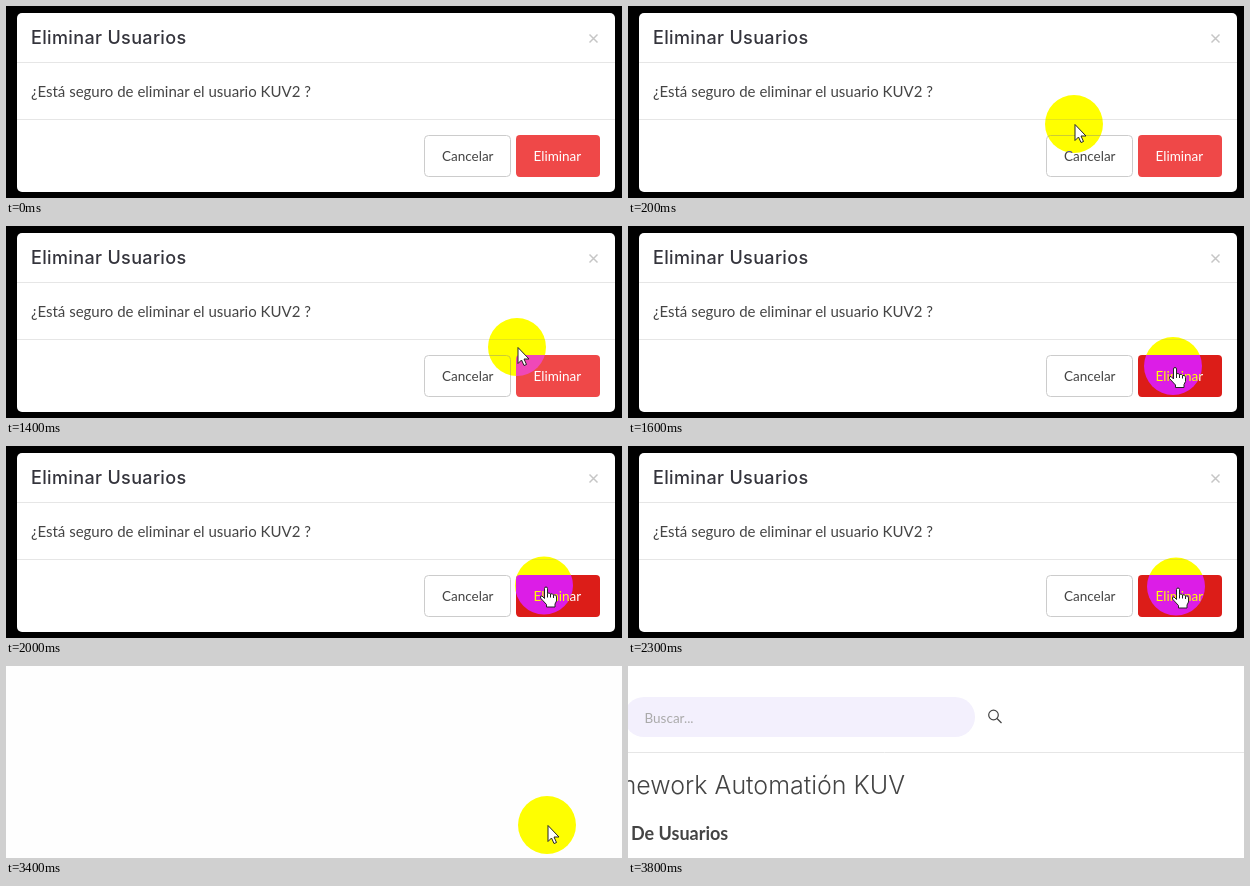
An HTML page for the animation above (3900 ms loop, 616 px wide and 192 px high).

```html
<!DOCTYPE html>
<html lang="es">
<head>
<meta charset="utf-8">
<style>
  html, body { margin: 0; width: 100%; height: 100%; overflow: hidden; background: #fff; }
  svg { display: block; width: 616px; height: 192px; isolation: isolate; }
  text { font-family: Lato, sans-serif; fill: #444; }
  .title { font: 500 18px Inter, sans-serif; letter-spacing: .35px; fill: #34343c; }
  .body { font-size: 15px; }
  .small { font-size: 13.5px; }
  .heading { font: 300 25px Inter, sans-serif; text-anchor: end; }
  .section { font-weight: 700; font-size: 18px; }
  .rule { stroke: #e6e6e6; }
  #halo { fill: #00f; mix-blend-mode: difference; }
  #arrow, #hand { fill: #fff; stroke: #222; stroke-linejoin: round; }
</style>
</head>
<body>
<svg viewBox="0 0 616 192">
  <rect width="616" height="192" fill="#fefefe"/>

  <g id="dialog">
    <rect width="616" height="192"/>
    <rect x="11" y="7" width="598" height="179" rx="5" fill="#fff"/>
    <path class="rule" d="M11 56.5H609M11 113.5H609"/>
    <text class="title" x="25" y="38">Eliminar Usuarios</text>
    <path d="M583.5 28.500l8 8m0-8l-8 8" stroke="#c6c6c6" stroke-width="1.5"/>
    <text class="body" x="25" y="91">¿Está seguro de eliminar el usuario KUV2 ?</text>
    <rect x="418.500" y="129.500" width="86" height="41" rx="4" fill="#fff" stroke="#ccc"/>
    <text class="small" x="436" y="155">Cancelar</text>
    <rect id="confirm" x="510" y="129" width="84" height="42" rx="4"/>
    <text class="small" x="527.500" y="155" style="fill:#fff">Eliminar</text>
  </g>

  <g id="page">
    <rect width="616" height="192" fill="#fff"/>
    <rect x="-4" y="31" width="351" height="40" rx="20" fill="#f3f0fd"/>
    <text class="small" x="16.500" y="57" style="fill:#aaa">Buscar...</text>
    <g fill="none" stroke="#444" stroke-width="1.200">
      <circle cx="365.500" cy="49" r="4.800"/>
      <path d="M369 52.500l4.500 4.500"/>
    </g>
    <path class="rule" d="M0 86.500H616"/>
    <text class="heading" x="277" y="128">Framework Automatión KUV</text>
    <text class="section" x="3" y="174">De Usuarios</text>
  </g>

  <g id="pointer">
    <circle id="halo" r="29"/>
    <path id="arrow" d="M1 .5V16.500L4.500 13L7 18.500L9.500 17.500L7 12H12Z"/>
    <g id="hand">
      <path d="M.5 3Q.5 1.500 2 1.500T3.500 3V8Q5 6.500 6.500 8.500Q8.500 7.500 9.500 9.500Q12.500 8.500 12.500 11.500V15.500L11 18.500V21.500H2.500V19L-3.500 12.500Q-4 10-2 10.500L.5 13Z"/>
      <path d="M3.500 8v4M6.500 8.500v3.500M9.500 9.500v3" fill="none"/>
    </g>
  </g>
</svg>
<script>
const LOOP = 3900, STEP = 100;
const $ = id => document.getElementById(id);
const show = (id, on) => $(id).style.display = on ? '' : 'none';

// Pointer path: time, x, y
const path = [
  [100, 445, 129], [200, 446, 118], [1000, 446, 118], [1100, 449, 119],
  [1200, 461, 114], [1300, 484, 113], [1400, 511, 121], [1500, 533, 133],
  [1600, 545, 140], [1900, 533, 139], [2200, 548, 140.5], [3300, 548, 140.5],
  [3400, 541, 159], [3800, 541, 159]
];

function pointerAt(t) {
  const i = Math.max(1, path.findIndex(key => key[0] >= t));
  const [t0, x0, y0] = path[i - 1], [t1, x1, y1] = path[i];
  const k = Math.max(0, (t - t0) / (t1 - t0));
  return [x0 + (x1 - x0) * k, y0 + (y1 - y0) * k];
}

function draw(now) {
  const t = Math.floor(now % LOOP / STEP) * STEP;
  const visible = t >= 100 && t < 3800;
  const [x, y] = pointerAt(t);
  const hover = visible && x >= 510 && y >= 129 && t < 3400;

  show('dialog', t < 2900);
  show('page', t >= 3800);
  show('pointer', visible);
  show('hand', hover);
  show('arrow', !hover);
  $('confirm').setAttribute('fill', hover ? '#dc1d18' : '#ef4848');
  // Moved part by part so the halo still blends with the backdrop
  for (const part of $('pointer').children)
    part.setAttribute('transform', `translate(${x} ${y})`);
}

const start = performance.now();
function tick() {
  draw(performance.now() - start);
  requestAnimationFrame(tick);
}
tick();
</script>
</body>
</html>
```
